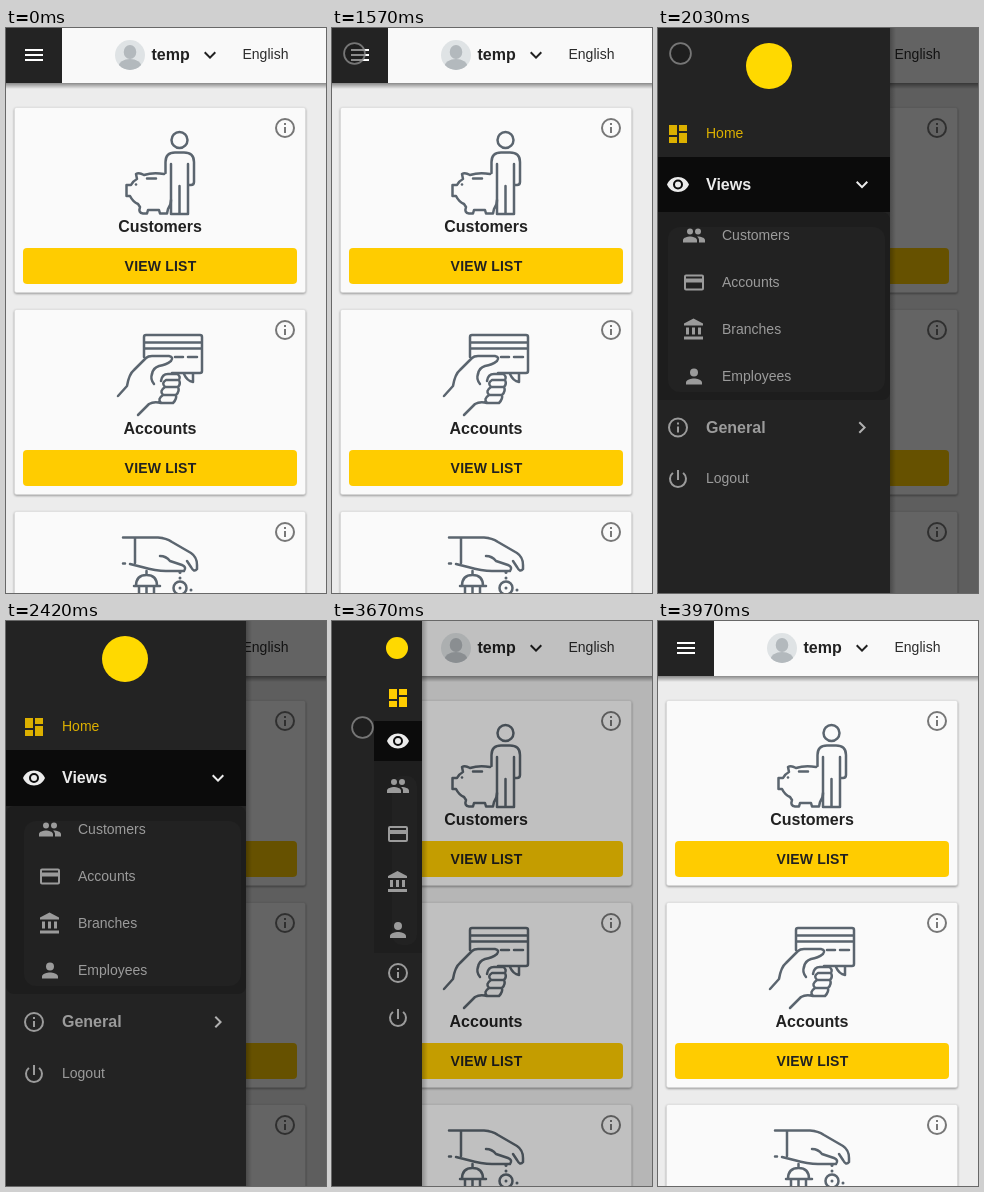
An HTML page for the animation above (4810 ms loop, 320 by 565 pixels).

```html
<!DOCTYPE html>
<html lang="en">
<head>
<meta charset="utf-8">
<title>Side menu</title>
<style>
html, body { margin: 0; width: 100%; height: 100%; overflow: hidden; background: #ececec; }
svg { display: block; width: 320px; height: 565px; font: 14px "Liberation Sans", Arial, sans-serif; }
.b { font-weight: bold; }
.big { font-size: 16px; font-weight: bold; }
.mid { text-anchor: middle; }
.line { fill: none; stroke: #5b656f; stroke-width: 2.5; stroke-linecap: round; stroke-linejoin: round; }
.card { filter: drop-shadow(0 1px 1px rgba(0, 0, 0, .38)); }
</style>
</head>
<body>
<svg id="stage" viewBox="0 0 320 565"></svg>
<script>
const LOOP = 4810;
const YELLOW = '#ffcc00', DARK = '#232323', GREY = '#9b9b9b', PALE = '#ececec';

// 24 x 24 glyphs
const GLYPHS = {
  menu: 'M3 18h18v-2H3zM3 13h18v-2H3zM3 6v2h18V6z',
  down: 'M16.59 8.59L12 13.17 7.41 8.59 6 10l6 6 6-6z',
  right: 'M10 6L8.59 7.41 13.17 12l-4.58 4.59L10 18l6-6z',
  info: 'M11 7h2v2h-2zM11 11h2v6h-2zM12 2a10 10 0 1 0 0 20 10 10 0 1 0 0-20zM12 20a8 8 0 1 1 0-16 8 8 0 1 1 0 16z',
  home: 'M3 13h8V3H3zM3 21h8v-6H3zM13 21h8V11h-8zM13 3v6h8V3z',
  eye: 'M12 4.5C7 4.5 2.73 7.61 1 12c1.73 4.39 6 7.5 11 7.5s9.27-3.11 11-7.5c-1.73-4.39-6-7.5-11-7.5zM12 17a5 5 0 1 1 0-10 5 5 0 1 1 0 10zM12 9a3 3 0 1 0 0 6 3 3 0 1 0 0-6z',
  people: 'M16 11a3 3 0 1 0 0-6 3 3 0 1 0 0 6zM8 11a3 3 0 1 0 0-6 3 3 0 1 0 0 6zM8 13c-2.33 0-7 1.17-7 3.5V19h14v-2.5C15 14.17 10.33 13 8 13zM16 13l-1 .05c1.16.84 2 1.97 2 3.45V19h6v-2.5c0-2.33-4.67-3.5-7-3.5z',
  card: 'M20 4H4a2 2 0 0 0-2 2v12a2 2 0 0 0 2 2h16a2 2 0 0 0 2-2V6a2 2 0 0 0-2-2zM20 18H4v-6h16zM20 8H4V6h16z',
  bank: 'M4 10v7h3v-7zM10 10v7h3v-7zM2 22h19v-3H2zM16 10v7h3v-7zM11.5 1L2 6v2h19V6z',
  person: 'M12 12a4 4 0 1 0 0-8 4 4 0 1 0 0 8zM12 14c-2.67 0-8 1.34-8 4v2h16v-2c0-2.66-5.33-4-8-4z',
  power: 'M13 3h-2v10h2zM17.83 5.17l-1.42 1.42A7 7 0 1 1 7.58 6.58L6.17 5.17A9 9 0 1 0 17.83 5.17z'
};

const icon = (name, x, y, fill, id = '') =>
  `<path ${id && `id="${id}"`} transform="translate(${x - 12} ${y - 12})" fill="${fill}" fill-rule="evenodd" d="${GLYPHS[name]}"/>`;
const text = (str, x, y, fill, cls = '', extra = '') =>
  `<text x="${x}" y="${y}" fill="${fill}" class="${cls}" ${extra}>${str}</text>`;
const rect = (x, y, w, h, fill, rx = 0, extra = '') =>
  `<rect x="${x}" y="${y}" width="${w}" height="${h}" rx="${rx}" fill="${fill}" ${extra}/>`;
const line = d => `<path class="line" d="${d}"/>`;
const dot = (x, y, r, fill) => `<circle cx="${x}" cy="${y}" r="${r}" fill="${fill}"/>`;

const customerArt =
  '<circle class="line" cx="173.5" cy="112" r="8"/>' +
  line('M159.5 145V134Q159.5 124.5 169 124.5H178Q188 124.5 188 134V154Q188 157 185 157H182M182 136V186H165V136M173.5 158V186') +
  line('M158 146Q147 144 138 147Q133 144 130 146L131 151Q127 153 125 157H120.5V168H124Q127 174 132 176L134 179Q132 185 137 185.5H141L142 182H153L154 185.5H161L162 181Q165 177 165 172M141 150.5H150') +
  dot(130, 156.5, 1.3, '#5b656f');

const accountArt =
  line('M138 329V309Q138 307 140 307H194Q196 307 196 309V343Q196 345 194 345H166M138 314.5H196M138 320.5H196M169 329H177M182 329H191') +
  line('M112 368L121 358Q123 346 128 342L140 330Q142 328 146 328H163Q168 329 165 333Q160 337 153 338Q147 340 146 346') +
  line('M146 346Q144 351 148 356M155 353Q156 346 162 346H171Q175 348 173 352H160Q155 355 159 359H172Q175 356 173 352M159 359Q153 363 157 367H170Q174 363 172 359M157 367Q151 371 155 375H167Q171 371 170 367M132 387L143 376Q148 373 155 375') +
  line('M178 346Q181 353 187 354V346');

const branchArt =
  line('M117 509.5H152Q160 510 166 514L185 525Q191 529 191 537V541Q188 545 185 539L181 533M129 510V535M117 535.5H119M124 536L136 539Q150 543 160 543H178Q181 539 176 537L164 533Q160 528 154 528') +
  line('M128 558H154M130 558Q130 547 140.5 547Q151 547 151 558M140.5 547V543M133 559V568M140.5 559V568M148 559V568') +
  '<circle class="line" cx="174" cy="560" r="6.5"/>' +
  [[174, 560], [174, 544.5], [174, 550], [185, 562]].map(p => dot(...p, 1.5, '#5b656f')).join('');

function card(y, title, art) {
  return `<g class="card">${rect(8.5, y + .5, 291, 185, '#fafafa', 2, 'stroke="#dcdcdc" stroke-width=".6"')}</g>` +
    icon('info', 279, y + 21, '#777') + art +
    text(title, 154, y + 125, '#212121', 'big mid') +
    rect(17, y + 141, 274, 36, YELLOW, 4) +
    text('VIEW LIST', 154.5, y + 164, '#212121', 'b mid', 'letter-spacing=".2"');
}

const page = rect(0, 0, 320, 565, '#ececec') +
  card(79, 'Customers', customerArt) +
  card(281, 'Accounts', accountArt) +
  card(483, 'Branches', branchArt) +
  rect(0, 55, 320, 6, 'url(#under)') +
  rect(0, 0, 320, 55, '#f9f9f9') + rect(0, 0, 56, 55, DARK) +
  icon('menu', 28, 27, '#fff') +
  dot(124, 27, 15, '#dfe3e5') +
  '<g clip-path="url(#face)" fill="#b3b9bd"><ellipse cx="124" cy="24" rx="6.3" ry="7"/><ellipse cx="124" cy="39" rx="11.5" ry="8"/></g>' +
  text('temp', 145.5, 32, '#212121', 'big') +
  icon('down', 204, 27, '#212121') +
  text('English', 236.5, 31, '#2b2b2b');

const subItems = [['people', 'Customers'], ['card', 'Accounts'], ['bank', 'Branches'], ['person', 'Employees']];

const wideMenu = rect(-20, 0, 260, 565, DARK) + rect(240, 0, 6, 565, 'url(#side)') +
  dot(119, 38, 23, '#ffd900') +
  rect(-4, 81, 165, 48, '#1d1d1d', 4, 'id="hover"') +
  icon('home', 28, 106, '#dcb000', 'homeIcon') + text('Home', 56, 110, '#dcb000', '', 'id="homeText"') +
  '<g id="sub">' + rect(0, 185, 240, 188, '#1d1d1d', 8) + rect(18, 200, 217, 165, '#222', 12) +
  subItems.map(([glyph, name], i) =>
    icon(glyph, 44, 208.5 + 47 * i, GREY) + text(name, 72, 213 + 47 * i, GREY)).join('') + '</g>' +
  rect(0, 129, 240, 56, '#0b0b0b', 0, 'id="bar"') +
  '<g id="views">' + icon('eye', 28, 157, PALE) + text('Views', 56, 162, PALE, 'big') + icon('down', 212, 157, PALE) + '</g>' +
  '<g id="general">' + icon('info', 28, 401, GREY) + text('General', 56, 406, GREY, 'big') + icon('right', 212, 401, '#b0b0b0') + '</g>' +
  '<g id="logout">' + icon('power', 28, 453, GREY) + text('Logout', 56, 457, GREY) + '</g>';

const slimMenu = rect(-60, 0, 108, 565, DARK) + rect(48, 0, 6, 565, 'url(#side)') +
  dot(23, 27, 11, '#ffd900') +
  rect(0, 100, 48, 40, '#0b0b0b') + rect(0, 140, 48, 192, '#1e1e1e') + rect(18, 155, 25, 169, '#222', 10) +
  icon('home', 24, 77, YELLOW) + icon('eye', 24, 120, PALE) +
  subItems.map(([glyph], i) => icon(glyph, 24, 165 + 48 * i, GREY)).join('') +
  icon('info', 24, 352, GREY) + icon('power', 24, 397, GREY);

const fade = (id, dir, alpha) => `<linearGradient id="${id}" x1="0" y1="0" ${dir}><stop stop-opacity="${alpha}"/><stop offset="1" stop-opacity="0"/></linearGradient>`;

const $ = id => document.getElementById(id);
$('stage').innerHTML =
  '<defs>' + fade('under', 'x2="0" y2="1"', .42) + fade('side', 'x2="1" y2="0"', .25) +
  '<clipPath id="face"><circle cx="124" cy="27" r="15"/></clipPath></defs>' +
  page + rect(0, 0, 320, 565, '#000', 0, 'id="dim"') +
  `<g id="wide">${wideMenu}</g><g id="slim">${slimMenu}</g>` +
  '<circle id="cursor" r="10.4" fill="rgba(25,25,25,.5)" stroke="rgba(140,140,140,.8)" stroke-width="1.8"/>';

// Each step holds until the next; unset parts are hidden.
const STEPS = [
  { t: 0 },
  { t: 1030, at: [91, -8] },
  { t: 1180, at: [61, 3] },
  { t: 1300, at: [39.5, 13.5] },
  { t: 1450, at: [27, 22.5] },
  { t: 1570, at: [22.5, 25.5] },
  { t: 1880, at: [22.5, 25.5], wide: 95.5, row: 41, dim: .235 },
  { t: 2030, at: [22.5, 25.5], wide: 232, row: 55, dim: .6 },
  { t: 2180, wide: 238.5, dim: .6 },
  { t: 2300, wide: 239.8, dim: .6 },
  { t: 2420, wide: 240, dim: .6 },
  { t: 2850, at: [30.5, 103.5], wide: 240, dim: .6 },
  { t: 2970, at: [40.5, 106.5], wide: 240, dim: .6 },
  { t: 3120, at: [43.5, 106.5], wide: 240, dim: .6 },
  { t: 3550, at: [43.5, 106.5], wide: 240, dim: .6, hover: true },
  { t: 3670, at: [30.5, 106.5], slim: 90, dim: .23 },
  { t: 3820, slim: 13 },
  { t: 3970 }
];

const show = (id, on) => $(id).setAttribute('visibility', on ? 'visible' : 'hidden');
const move = (id, x, y) => $(id).setAttribute('transform', `translate(${x} ${y})`);

function draw({ at, wide, slim, row = 56, dim = 0, hover }) {
  $('dim').setAttribute('opacity', dim);
  show('wide', wide);
  show('slim', slim);
  show('cursor', at);
  show('hover', wide && hover);
  if (at) move('cursor', ...at);
  if (slim) move('slim', slim - 48, 0);
  if (!wide) return;
  const shift = row - 56;
  move('wide', wide - 240, 0);
  move('views', 0, shift / 2);
  move('sub', 0, shift);
  move('general', 0, shift * 1.5);
  move('logout', 0, shift * 2);
  $('bar').setAttribute('height', row);
  for (const id of ['homeIcon', 'homeText']) $(id).setAttribute('fill', hover ? '#c9a000' : '#dcb000');
}

let current;
const start = performance.now();
function tick() {
  const time = (performance.now() - start) % LOOP;
  const step = STEPS.findLast(s => s.t <= time);
  if (step !== current) draw(current = step);
  requestAnimationFrame(tick);
}
tick();
</script>
</body>
</html>
```
